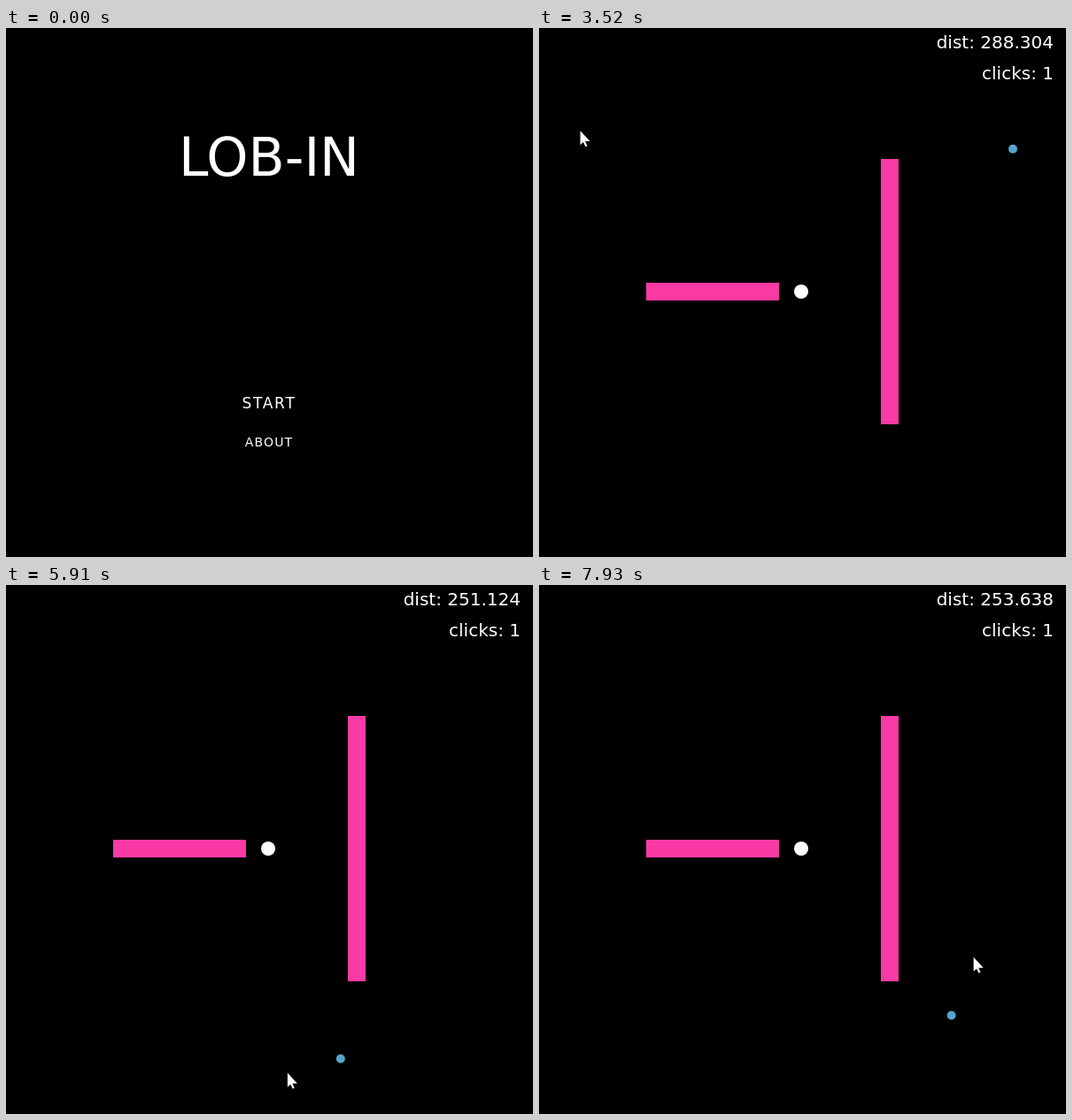
An HTML page for the animation above (8000 ms loop, 595x598 px).

```html
<!DOCTYPE html>
<html lang="en">
<head>
<meta charset="utf-8">
<title>LOB-IN</title>
<style>
  html, body { margin: 0; width: 100%; height: 100%; overflow: hidden; background: #000; }
  svg { display: block; width: 100%; height: 100%; }
  text { font-family: "DejaVu Sans", sans-serif; fill: #fff; }
  .mid { text-anchor: middle; }
  .hud { text-anchor: end; font-size: 20px; }
</style>
</head>
<body>
<svg viewBox="0 0 595 598">
  <rect width="595" height="598"/>
  <g id="menu">
    <text class="mid" x="297" y="167" font-size="60">LOB-IN</text>
    <text class="mid" x="297" y="430" font-size="17" letter-spacing=".1em">START</text>
    <text class="mid" x="297" y="473" font-size="14" letter-spacing=".08em">ABOUT</text>
  </g>
  <g id="game">
    <rect x="121" y="288" width="150" height="20" fill="#f93aa4"/>
    <rect x="386" y="148" width="20" height="300" fill="#f93aa4"/>
    <circle cx="296" cy="298" r="8" fill="#fff"/>
    <circle id="ball" r="5" fill="#54a5cb"/>
    <text class="hud" id="dist" x="581" y="23"></text>
    <text class="hud" id="clicks" x="581" y="58"></text>
  </g>
  <g id="cursor">
    <circle id="press" r="12" fill="#ff0" opacity=".5"/>
    <path id="arrow" fill="#fff" stroke="#000" paint-order="stroke"
      d="M1 1V17L4.4 13.8 6.9 19 8.9 18 6.5 12.8H12Z"/>
    <g id="hand" stroke="#000" transform="translate(1 1)">
      <path fill="#fff" paint-order="stroke"
        d="M-1 2a1.7 1.7 0 0 1 3.4 0V8L9 9.3Q11 10 11 12.5V16Q11 18 9.5 20L7 22H1L-1 20-5 14.5Q-6 12-4 11.5-2.5 11.5-1 13.5Z"/>
      <path stroke-width=".8" d="M2.4 8v4M5.4 8.5v4M8.3 9.2v3.6"/>
    </g>
  </g>
</svg>
<script>
const $ = id => document.getElementById(id);
const show = (id, on) => $(id).setAttribute('display', on ? 'inline' : 'none');

const LOOP = 8000, REFRESH = 77.6;
const ENTER = 490, CLICK = 1360, PLAY = 1500, AIM = 2880, LAUNCH = 3200;
const TARGET = { x: 296, y: 298 }, HOME = { x: 26, y: 28 };

// The shot is traced both ways from one known pass: sideways reach, drag per ms, slope
const PASS = { t: 4210, x: 287, y: 337.0842 };
const REACH = 759, DRAG = 0.00121, SLOPE = 0.4636, KICK = 1.2;
const LEFT = 1, RIGHT = 591, TOP = 3, FLOOR = 595, RADIUS = 5;

const bars = [...document.querySelectorAll('#game rect')].map(r => r.getBBox());
const inBar = (x, y) => bars.some(b =>
  x > b.x - RADIUS && x < b.x + b.width + RADIUS &&
  y > b.y - RADIUS && y < b.y + b.height + RADIUS);

function shot(t) {
  const reach = REACH * (1 - Math.exp(-DRAG * (t - PASS.t)));
  let { x, y } = PASS, vx = -Math.sign(reach), vy = SLOPE * Math.sign(reach);
  for (let left = Math.abs(reach); left > 0; left--) {
    const step = Math.min(1, left);
    const nx = x + vx * step, ny = y + vy * step;
    if (nx < LEFT || nx > RIGHT || inBar(nx, y)) vx = -vx;
    if (ny > FLOOR) vy *= -KICK;
    else if (ny < TOP || inBar(x, ny)) vy = -vy;
    x += vx * step;
    y += vy * step;
  }
  return { x, y };
}

// Pointer stops: time, x, y
const stops = [
  [ENTER, 464, 580], [1270, 308, 423], [PLAY, 308, 423], [2110, 62, 81],
  [2590, 28, 37], [AIM, 24, 34], [LAUNCH, 24, 34], [4210, 94, 297],
  [5220, 210, 541], [6600, 421.5, 560], [LOOP, 493, 413]
];

function pointer(t) {
  const i = Math.max(1, stops.findIndex(s => s[0] > t));
  const [t0, x0, y0] = stops[i - 1], [t1, x1, y1] = stops[i];
  const w = Math.max(0, (t - t0) / (t1 - t0));
  return { x: x0 + (x1 - x0) * w, y: y0 + (y1 - y0) * w };
}

// The picture refreshes in even steps that include the known pass
const refresh = t => PASS.t + Math.floor((t + 16 - PASS.t) / REFRESH) * REFRESH;

function draw(time) {
  const t = Math.min(refresh(time), LOOP - 1);
  const playing = time >= PLAY, launched = time >= LAUNCH;
  show('menu', !playing);
  show('game', playing);

  const ball = launched ? shot(t) : HOME;
  $('ball').setAttribute('cx', ball.x);
  $('ball').setAttribute('cy', ball.y);
  const dist = Math.hypot(ball.x - TARGET.x, ball.y - TARGET.y);
  $('dist').textContent = `dist: ${dist.toFixed(3)}`;
  $('clicks').textContent = `clicks: ${launched ? 1 : 0}`;

  const { x, y } = pointer(t);
  const hover = !playing && y < 432;
  show('cursor', time >= ENTER);
  $('cursor').setAttribute('transform', `translate(${x} ${y})`);
  show('hand', hover);
  show('arrow', !hover);
  show('press', (time >= CLICK && !playing) || (time >= AIM && !launched));
}

const start = performance.now();
function loop() {
  draw((performance.now() - start) % LOOP);
  requestAnimationFrame(loop);
}
loop();
</script>
</body>
</html>
```
